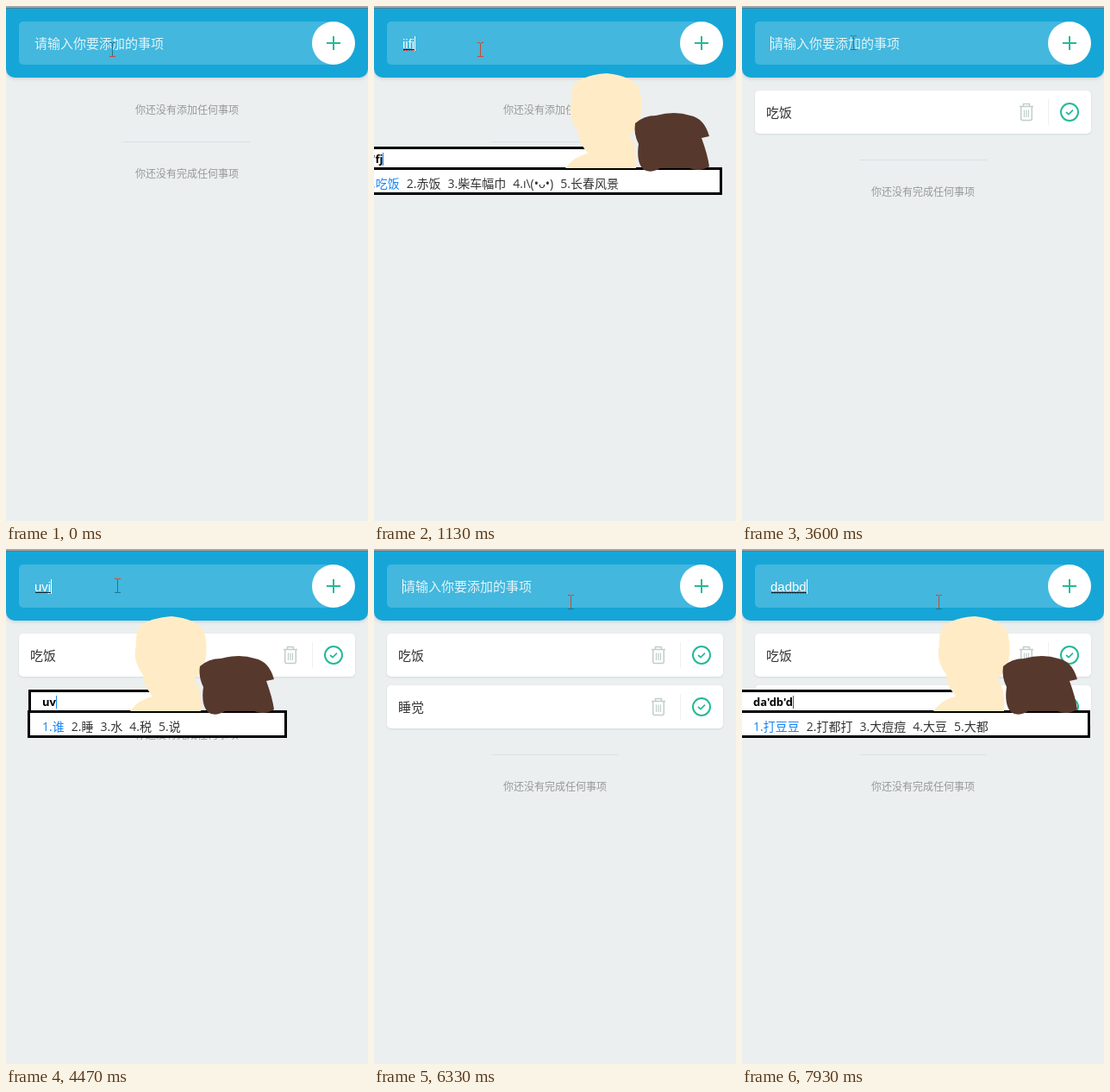
Write an HTML page that moves like this. It is 420 px wide and 597 px high and loops after 8000 ms.

```html
<!DOCTYPE html>
<html lang="zh-CN">
<head>
<meta charset="utf-8">
<title>待办事项</title>
<style>
html, body { margin: 0; width: 100%; height: 100%; overflow: hidden; background: #ebeff0; }
svg { display: block; }
text { font-family: "Open Sans", "Noto Sans CJK SC", "Noto Sans CJK", sans-serif; white-space: pre; }
.hint { font-size: 12px; font-weight: 300; fill: #999; text-anchor: middle; }
.field { font: 15px "Liberation Sans", "Noto Sans CJK SC", "Noto Sans CJK", sans-serif; font-weight: 300; fill: #fff; }
.label { font-size: 15px; fill: #333; }
.preedit { font-size: 13px; font-weight: 700; }
.cands { font-size: 14px; fill: #333; }
.header { filter: drop-shadow(0 1px 2px rgba(44,62,80,.2)); }
.card { filter: drop-shadow(0 1px 1px rgba(44,62,80,.12)); }
</style>
</head>
<body>
<svg width="420" height="597" viewBox="0 0 420 597">
  <defs>
    <g id="row">
      <rect class="card" x="15" y="98" width="390" height="50" rx="5" fill="#fff"/>
      <path d="M355.5 108v30" stroke="#edf0f1"/>
      <g fill="none" stroke="#c0cecb" stroke-width="1.5">
        <path d="M322 116.5h16M326.500 116v-2.500h7v2.500M323.700 117v13.500q0 2 2 2h8.600q2 0 2-2v-13.500"/>
        <path d="M327.500 120.500v8.500M330 120.500v8.500M332.500 120.500v8.500" stroke-width="1.200"/>
      </g>
      <g fill="none" stroke="#25b99a" stroke-width="2">
        <circle cx="380" cy="123" r="10"/>
        <path d="M376 123l3 2.700l5-5" stroke-width="1.700"/>
      </g>
    </g>
  </defs>

  <rect width="420" height="597" fill="#ebeff0"/>
  <path class="header" d="M0 2H420V73a10 10 0 0 1-10 10H10a10 10 0 0 1-10-10z" fill="#15a6d7"/>
  <rect width="420" height="2" fill="#a5a5a8"/>
  <rect y="2" width="420" height="1" fill="#527f92"/>
  <path d="M380 18H20a5 5 0 0 0-5 5V63a5 5 0 0 0 5 5H380z" fill="#43b7dd"/>
  <circle cx="380" cy="43" r="25" fill="#fff"/>
  <path d="M372 43h16M380 35v16" stroke="#25b99a" stroke-width="2"/>

  <text id="placeholder" class="field" x="33" y="48.500" opacity=".85">请输入你要添加的事项</text>
  <text id="typed" class="field" x="33" y="49"></text>
  <path id="underline" stroke="#10222b"/>
  <path id="spelling" stroke="#c8414a" stroke-dasharray="2 1"/>
  <rect id="caret" y="35" width="1" height="17" fill="#fff"/>

  <text id="noTodo" class="hint" x="210" y="124.500">你还没有添加任何事项</text>
  <g id="rows">
    <g><use href="#row"/><text class="label" x="28" y="128.500">吃饭</text></g>
    <g transform="translate(0 60)"><use href="#row"/><text class="label" x="28" y="128.500">睡觉</text></g>
  </g>
  <g id="done">
    <path d="M136 .5h148" stroke="#d9e2e2"/>
    <text class="hint" x="210" y="41.500">你还没有完成任何事项</text>
  </g>

  <g id="ime">
    <g fill="#fff" stroke="#000" stroke-width="3">
      <rect id="preBox" y="164.500" height="24"/>
      <rect id="candBox" y="188.500" height="29"/>
    </g>
    <text id="preedit" class="preedit" y="182"></text>
    <rect id="preCaret" y="170" width="1" height="15"/>
    <text id="cands" class="cands" y="211"></text>
    <g id="figures">
      <path fill="#ffecc6" d="M222 188Q232 174 248 171Q237 157 237 146Q224 128 229 112Q228 101 232 90Q248 79 270 78Q300 81 308 96Q314 120 306 140Q301 147 296 151Q306 160 304 188z"/>
      <path fill="#57382c" d="M303 136Q313 127 327 127Q349 121 367 127Q383 130 389 151L380 153Q387 172 389 186Q378 193 366 188H332Q320 195 312 189Q304 180 307 160Q301 148 303 136z"/>
    </g>
  </g>

  <g id="beam" fill="none">
    <path id="beamStem" d="M0 -7.500v15"/>
    <path id="beamTop" d="M-3.500 -8h3m1 0h3"/>
    <path id="beamBottom" d="M-3.500 8h7"/>
  </g>
  <path id="hand" fill="#fff" stroke="#000" stroke-linejoin="round"
    d="M-1.500 14L-5.500 8.500Q-6 6.500-4 6.500L-1.500 9V1.500Q0-.5 1.500 1.500V6.500Q3 5 4.500 7Q6 5.700 7.500 7.700Q9.500 7 10.500 9V14L8.500 18V21H.5V18z"/>
</svg>
<script>
const LOOP = 8000, TICKS_PER_MS = 0.015, BLINK = 8;
const el = Object.fromEntries([...document.querySelectorAll("svg [id]")].map(n => [n.id, n]));

// Input text from each tick on
const typing = [
  [0, ""], [8, "i"], [10, "ii"], [13, "iif"], [16, "iifj"], [23, "吃饭"], [39, ""],
  [60, "u"], [64, "uv"], [67, "uvj"], [69, "uvjc"], [71, "睡觉"], [91, ""],
  [109, "d"], [111, "da"], [114, "dad"], [116, "dadb"], [118, "dadbd"]
];

// Input method window: tick, keys, candidates, left, right
const windows = [
  [0], [9, "i", "吃 持 尺 池 迟", 26, 325], [11, "ii", "吃 持 尺 池 迟", 26, 325],
  [14, "ii'f", "吃饭 吃法 痴肥 持份 赤峰", 35, 403],
  [17, "ii'fj", "吃饭 赤饭 柴车幅巾 ı\\(•ᴗ•) 长春风景", -26, 403], [24],
  [62, "u", "是 上 说 _(:з｣∠)_ 时", 26, 403], [65, "uv", "谁 睡 水 税 说", 26, 325],
  [68, "uv'j", "睡觉 水晶 谁家 水井 税金", 35, 403],
  [70, "uv'jc", "睡觉 水饺 睡觉觉 水教 睡觉了", -3, 403], [71],
  [110, "d", "的 都 打 _(:з｣∠)_ の", 37, 403], [112, "da", "大 打 达 答 搭", 26, 325],
  [115, "da'd", "大的 打的 达到 大地 大道", 35, 403],
  [117, "da'db", "打豆 大豆 打都 大都 大痘", 35, 403],
  [119, "da'db'd", "打豆豆 打都打 大痘痘 大豆 大都", -3, 403]
];

// Pointer: tick, x, y
const pointer = [
  [26, 123.5, 50.5], [30, 190, 30], [34, 300, 19], [36, 365, 38], [38, 396, 52], [39, 396, 52],
  [44, 129.5, 42.5], [77, 129.5, 42.5], [83, 267.5, 46], [86, 350, 40], [88, 392, 64],
  [90, 395, 60], [95, 228.5, 61.5]
];

const focusTicks = [8, 38, 90, ...typing.filter(s => s[1]).map(s => s[0])];

const latest = (list, tick) => list.filter(s => s[0] <= tick).at(-1);
const show = (node, on) => node.setAttribute("display", on ? "inline" : "none");
const set = (node, attrs) => { for (const k in attrs) node.setAttribute(k, attrs[k]); };
const move = (node, x, y) => set(node, { transform: `translate(${x} ${y})` });

function pointerAt(tick) {
  const i = pointer.findIndex(p => p[0] > tick);
  if (i === 0) return pointer[0].slice(1);
  if (i < 0) return pointer.at(-1).slice(1);
  const [t0, x0, y0] = pointer[i - 1], [t1, x1, y1] = pointer[i];
  const k = (tick - t0) / (t1 - t0);
  return [x0 + (x1 - x0) * k, y0 + (y1 - y0) * k];
}

function drawInput(tick) {
  const text = latest(typing, tick)[1];
  const composing = /[a-z]/.test(text);
  el.typed.textContent = text;
  const end = 33 + (text ? el.typed.getComputedTextLength() : 0);
  const since = tick - Math.max(...focusTicks.filter(f => f <= tick));
  show(el.placeholder, !text);
  show(el.underline, composing);
  show(el.spelling, composing && text.length > 3);
  set(el.underline, { d: `M34 50.500H${end}` });
  set(el.spelling, { d: `M34 51.500H${end}` });
  show(el.caret, tick >= 8 && (composing || Math.floor(since / BLINK) % 2 === 0));
  set(el.caret, { x: Math.round(end) });
}

function drawList(tick) {
  const count = tick >= 91 ? 2 : tick >= 39 ? 1 : 0;
  [...el.rows.children].forEach((row, i) => show(row, i < count));
  show(el.noTodo, !count);
  move(el.done, 0, count ? 118 + 60 * count : 157);
}

function drawWindow(tick) {
  const [, keys, words, left, right] = latest(windows, tick);
  show(el.ime, keys);
  if (!keys) return;
  const x = left + 16;
  set(el.candBox, { x: left + 0.5, width: right - left - 1 });
  set(el.preBox, { x: left + 1.5, width: right - left - 142 });
  el.preedit.textContent = keys;
  set(el.preedit, { x });
  set(el.preCaret, {
    x: Math.round(x + el.preedit.getComputedTextLength()),
    fill: tick < 100 ? "#1e88e5" : "#555"
  });
  set(el.cands, { x });
  el.cands.innerHTML = words.split(" ").map((word, i) =>
    `<tspan ${i ? 'dx="8"' : 'fill="#1684f5"'}>${i + 1}.${word}</tspan>`).join("");
  move(el.figures, right - 403, 0);
}

function drawPointer(tick) {
  const [x, y] = pointerAt(tick);
  const overButton = Math.hypot(x - 380, y - 43) < 25;
  const teal = "#1c7894", red = "#c8492f";
  show(el.hand, overButton);
  show(el.beam, !overButton);
  move(el.hand, x, y);
  move(el.beam, Math.floor(x) + 0.5, Math.floor(y) + 0.5);
  set(el.beamTop, { stroke: tick < 9 || (tick >= 44 && tick < 49) ? teal : red });
  set(el.beamStem, { stroke: tick < 9 || (tick >= 39 && tick <= 90) ? teal : red });
  set(el.beamBottom, { stroke: tick < 39 ? red : teal });
}

let shown = -1;
function draw(ms) {
  const tick = Math.floor((ms % LOOP) * TICKS_PER_MS + 0.06) % 120;
  if (tick === shown) return;
  shown = tick;
  drawInput(tick);
  drawList(tick);
  drawWindow(tick);
  drawPointer(tick);
}

const start = performance.now();
function loop() {
  draw(performance.now() - start);
  requestAnimationFrame(loop);
}
loop();
</script>
</body>
</html>
```
